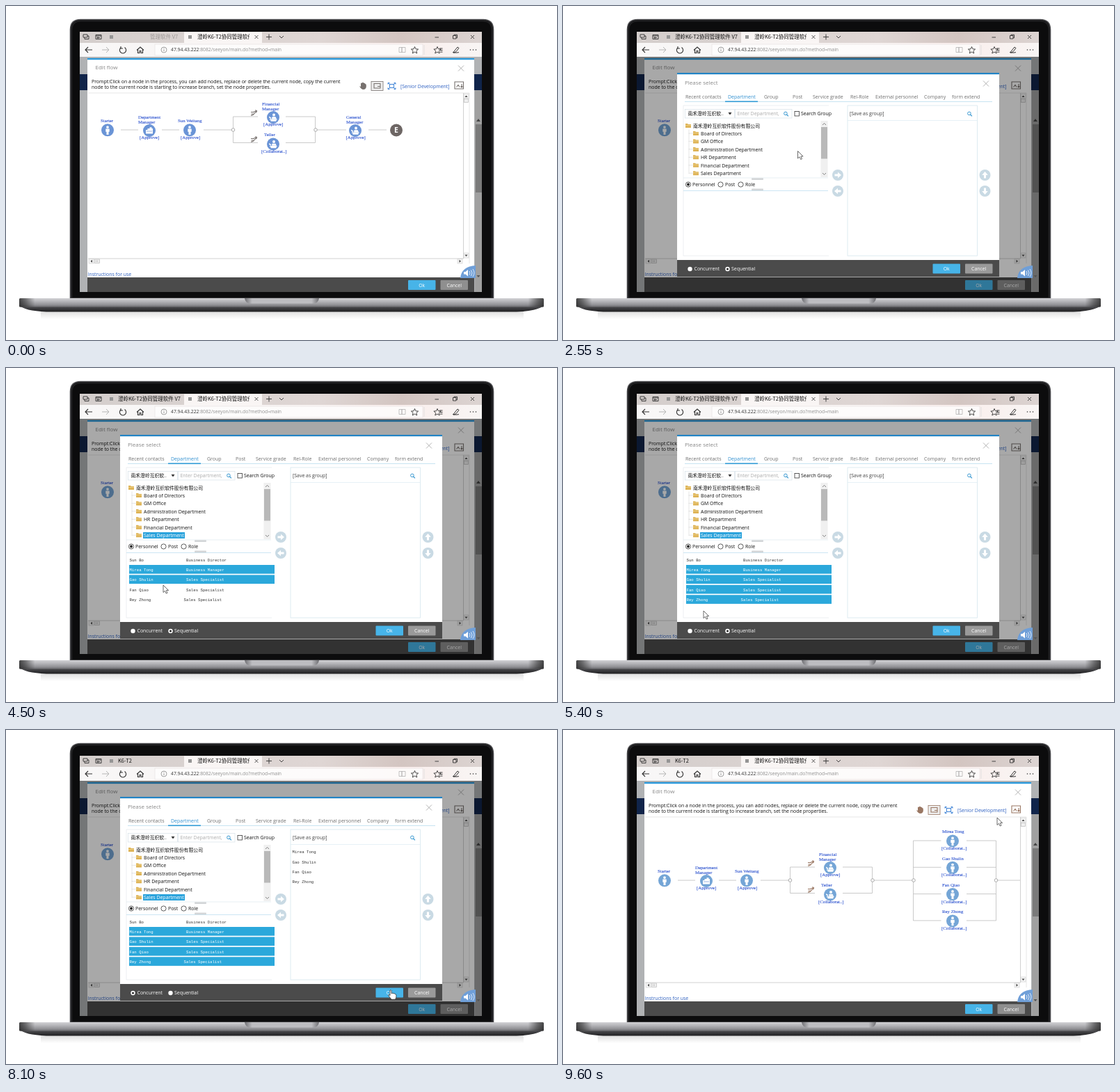
Animation of 792x480 px, one loop 9750 ms. Source, as an HTML page:

```html
<!DOCTYPE html>
<html lang="en">
<head>
<meta charset="utf-8">
<title>Edit flow</title>
<style>
html, body { margin: 0; width: 100%; height: 100%; overflow: hidden; background: #fff; }
svg { display: block; width: 792px; height: 480px; }
text { font: 6.95px "Open Sans", "Noto Sans CJK SC", sans-serif; fill: #111; white-space: pre; }
.title { font-size: 8px; fill: #888; }
.tab { font-size: 7px; fill: #6f6f6f; }
.on { fill: #2f8fd0; }
.url { font-size: 6.8px; fill: #8f8f8f; }
.cjk { font: 7.5px "Noto Sans CJK SC", "Noto Sans CJK", sans-serif; }
.org { font-size: 6.86px; }
.mono { font: 5.7px "Liberation Mono", monospace; fill: #333; }
.node { font: 6.8px "Liberation Serif", serif; fill: #2f55cf; stroke: #2f55cf; stroke-width: .12; }
.link { fill: #2c5fc0; }
.white { fill: #fff; }
.hint { fill: #aaa; }
.mid { text-anchor: middle; }
.ball { fill: var(--ball); }
</style>
</head>
<body>
<script>
const LOOP = 9750, STEP = 150;
const people = [
  ["Sun Bo", "Business Director", 259],
  ["Mirea Tong", "Business Manager", 259],
  ["Gao Shulin", "Sales Specialist", 259],
  ["Fan Qiao", "Sales Specialist", 259],
  ["Rey Zhong", "Sales Specialist", 255.5]
];

const text = (x, y, s, cls = "", more = "") => `<text x="${x}" y="${y}" class="${cls}" ${more}>${s}</text>`;
const rect = (x, y, w, h, fill, more = "") => `<rect x="${x}" y="${y}" width="${w}" height="${h}" fill="${fill}" ${more}/>`;
const disc = (x, y, r, fill, more = "") => `<circle cx="${x}" cy="${y}" r="${r}" fill="${fill}" ${more}/>`;
const line = (d, color = "#bdbdbd", w = .8, more = "") => `<path d="${d}" fill="none" stroke="${color}" stroke-width="${w}" ${more}/>`;
const shape = (d, fill, more = "") => `<path d="${d}" fill="${fill}" ${more}/>`;
const group = (id, body) => `<g id="${id}">${body}</g>`;
const cross = (x, y, r, color, w) => line(`M${x - r} ${y - r}l${2 * r} ${2 * r}m0 ${-2 * r}l${-2 * r} ${2 * r}`, color, w);
const button = (x, y, w, fill, label) => rect(x, y, w, 14, fill, 'rx="1"') + text(x + w / 2, y + 9.8, label, "white mid");
const lens = (x, y) => disc(x - .6, y - .6, 2.3, "none", 'stroke="#3c9ad2"') + line(`M${x + 1} ${y + 1}l2.4 2.4`, "#3c9ad2", 1.3);

function laptop() {
  return rect(50, 438, 694, 12, "url(#shade)")
    + shape("M92.5 420V34Q92.5 19.5 107 19.5H686Q700.5 19.5 700.5 34V420Z", "#0c0c0d", 'stroke="#4c4c4f" stroke-width="1.6"')
    + line("M94.5 419V35Q94.5 21.5 108 21.5H685Q698.5 21.5 698.5 35V419", "#232325", 1.5)
    + shape("M19 430H773Q766 438 734 439.5H58Q26 438 19 430Z", "url(#under)")
    + rect(19, 420, 754, 12.5, "url(#base)", 'rx="1.5"')
    + rect(19, 420, 754, 12.5, "url(#ends)", 'rx="1.5"')
    + shape("M343 420H450Q449 427.5 441 427.5H352Q344 427.5 343 420Z", "url(#notch)");
}

function browser() {
  const ink = "#333";
  const star = (x, y) => line(`M${x} ${y - 5}l1.5 3.3 3.6 .3-2.7 2.4 .8 3.5-3.2-1.9-3.2 1.9 .8-3.5-2.7-2.4 3.6-.3z`, ink, .9);
  return rect(106, 37, 578, 16, "url(#bar)")
    + rect(256, 37.5, 112, 16, "#f9f5f4")
    + line("M111 41h6v4h-6zM113 45v2.5h6v-4.5h-2M129 41.5h8v6h-8zM129 43h8M135 45.5h-4m1.5-1.5l-1.5 1.5 1.5 1.5", ink, .9)
    + rect(149, 42, 5, 5, "#959595") + rect(262, 42, 5, 5, "#959595")
    + text(161, 47.2, "澄岭K6-T2协同管理软件 V7", "cjk", 'id="tabFull"')
    + text(207, 47.2, "管理软件 V7", "cjk", 'id="tabPart" fill-opacity=".3"')
    + text(161, 47.2, "K6-T2", "cjk", 'id="tabShort"')
    + `<g clip-path="url(#tabClip)">${text(275, 47.2, "澄岭K6-T2协同管理软件", "cjk")}</g>`
    + cross(360, 44.5, 2.5, ink, .8)
    + line("M374 44.5h8m-4-4v8M393 43l3 3 3-3M616.5 45h5.5M642.5 42.5h4.5v4.5h-4.5zM644 42.5v-1.2h4.5v4.5h-1.3", ink, .9)
    + cross(670.5, 44.5, 2.5, ink, .9)
    + rect(106, 53, 578, 20, "url(#nav)")
    + rect(214, 55, 385, 16, "#fff", 'fill-opacity=".7" stroke="#e3dedd" stroke-width=".6"')
    + line("M124 63h-10m4-4l-4 4 4 4", ink, 1.1) + line("M138 63h10m-4-4l4 4-4 4", "#b5b5b5", 1)
    + line("M165.5 59.5a4.6 4.6 0 1 0 5 0M165 58v3h3M188 63.5l5-4.5 5 4.5M189.5 62.5v5h2.5v-3h2v3h2.5v-5", ink, 1.1)
    + disc(227, 63, 4, "none", 'stroke="#888" stroke-width=".8"') + line("M227 62.5v2.5M227 60.5v1", "#888", .9)
    + `<text x="237" y="64.8" class="url"><tspan fill="#333">47.94.43.222</tspan>:8082/seeyon/main.do?method=main</text>`
    + line("M565 59.5h4v7h-4zM569 59.5h5v7h-5z", "#aaa", .7)
    + star(587.5, 63.5) + line("M601 56v14", "#ddd") + star(620, 63.5)
    + line("M623 61h4.5M624 63.5h3.5M624 66h3.5M642 67q2-1 3-3l4-5 2 1.5-4 5q-2 1.5-4 1.5h6q1-1 2 0", ink, 1)
    + disc(667.5, 63, .8, ink) + disc(671.5, 63, .8, ink) + disc(675.5, 63, .8, ink);
}

const person = `<circle cy="-4.2" r="1.9"/><path d="M-2.7-1.7h5.4v4.2h-1.2v4.3h-3v-4.3h-1.2z"/>`;
const clerk = `<circle cx="1" cy="-3.6" r="2"/><path d="M-1.5-.8h5l1.5 3h-7zM-5.5-1.5l3 2.5-1 1.2-2.5-2zM-5 2.6h10.5v1.2h-1v2h-8v-2h-1.5z"/>`;
const desk = `<path d="M-5-1h2.5v-2h3v-1.8h3v1.8h1.5v2v5.5h-10z"/><path d="M-4 1h8" stroke="#6a94d6" stroke-width=".7"/>`;
const icon = (x, y, art) => disc(x, y, 9, "none", 'class="ball"') + `<g transform="translate(${x} ${y})" fill="#fff">${art}</g>`;
const joint = (x, y) => disc(x, y, 2.3, "#fff", 'stroke="#999" stroke-width=".8"');
const fork = y => `<g transform="translate(356 ${y})">${line("M-4 3q3 .5 4.5-2t4-2.5M-4-1.5h4q1.5-1.5 4-1.5M2.5-4.5l2 1.5-2 1.5M-3.5 1h3", "currentColor", 1.2)}</g>`;

// Left part of the chart, its axis at height y
function chart(y) {
  const a = y - 19, b = y + 18.5;
  return line(`M165 ${y}h25M224 ${y}h25M284 ${y}h42M362 ${a}H326.5V${b}H362M402 ${a}H444.5V${b}H402`)
    + joint(326.5, y) + joint(445, y)
    + icon(146, y + .3, person) + icon(206, y + 1, desk) + icon(264, y + .3, person)
    + icon(384, y - 18, clerk) + icon(384, y + 20.5, clerk) + fork(y - 24) + fork(y + 14)
    + text(136, y - 10.8, "Starter", "node")
    + text(190, y - 15.8, "Department", "node") + text(190, y - 9, "Manager", "node") + text(192, y + 13, "[Approve]", "node")
    + text(247, y - 10.8, "Sun Weitang", "node") + text(251, y + 13, "[Approve]", "node")
    + text(368, y - 35, "Financial", "node") + text(368, y - 28, "Manager", "node") + text(370, y - 6, "[Approve]", "node")
    + text(371, y + 8.5, "Teller", "node") + text(367, y + 32.5, "[Collaborat..]", "node");
}

function flowBefore() {
  return line("M447 178h42M521 178h26") + chart(178)
    + icon(502, 179, clerk) + text(489, 162.2, "General", "node") + text(489, 169, "Manager", "node") + text(488.5, 191, "[Approve]", "node")
    + disc(561, 178.5, 9, "#6d6664") + text(561, 182.3, "E", "white mid", 'style="font-size:10.5px;font-weight:700"');
}

function flowAfter() {
  let s = line("M447 216h57M622 216h35M503.5 159v115M622.5 159v115");
  people.slice(1).forEach(([name], i) => {
    const y = 159 + i * 38.3;
    s += line(`M503.5 ${y}h40M580 ${y}h42.5`) + icon(560, y + .5, person)
      + text(545, y - 10.8, name, "node") + text(544, y + 13, "[Collaborat..]", "node");
  });
  return s + joint(504, 216) + joint(622.5, 216) + chart(216);
}

function editor() {
  const tri = d => shape(d, "#444");
  return rect(106, 73, 578, 338, "#b0b2b4")
    + rect(106, 98, 578, 23, "#10244a")
    + rect(674, 121, 10, 290, "#a0a0a0") + rect(675, 170, 9, 98, "#7a7a7a") + tri("M676 166l3-4 3 4z")
    + rect(117, 75, 556, 336, "#fff") + rect(117, 75, 556, 2.2, "#2698dc")
    + text(128.5, 91, "Edit flow", "title") + cross(654, 89.5, 4, "#aaa", .9)
    + text(123, 111.3, "Prompt:Click on a node in the process, you can add nodes, replace or delete the current node, copy the current")
    + text(123, 119, "node to the current node is starting to increase branch, set the node properties.")
    + group("tools",
      shape("M508 115l2 1v-5q1-1 1.5 0l.5-1q1-.6 1.5 .3 1.2-.4 1.5 .6 1.3 0 1.5 1.2 1.3 0 1.3 1.5v3q-1 3.5-4 3.5-3.5 0-5.8-5.1z", "currentColor")
      + rect(525, 108.5, 17, 13, "#eee", 'stroke="currentColor" stroke-width=".8"') + line("M529 111.5h9v6.5h-9zM534 115.5h4", "currentColor", 1.1)
      + line("M645 109h12.5v10h-12.5zM647.5 116.5l2.5-3 2 3M655 112v5m-1.5-1.5l1.5 1.5 1.5-1.5", "currentColor", 1.1))
    + rect(551.5, 112.5, 6, 5, "none", 'stroke="#3d82d6"')
    + line("M549 110.5l2.5 2m6 0l2.5-2m0 9l-2.5-2m-6 0l-2.5 2M549 112.5v-2h2.5M560 112.5v-2h-2.5M549 117.5v2h2.5M560 117.5v2h-2.5", "#3d82d6", 1)
    + text(567, 117.5, "[Senior Development]", "link")
    + line("M118 125H666V370", "#ddd", .7) + line("M657.5 125V363H118", "#c6c6c6", .8)
    + rect(658, 126, 7, 7, "#f4f4f4", 'stroke="#ccc" stroke-width=".6"') + tri("M659.5 131l2-2.5 2 2.5z")
    + rect(658.5, 133.5, 6, 5, "#f0f0f0", 'stroke="#bbb" stroke-width=".7"')
    + rect(658, 355, 7, 7, "#f4f4f4", 'stroke="#ccc" stroke-width=".6"') + tri("M659.5 357.5l2 2.5 2-2.5z")
    + rect(119, 363.5, 7, 6.5, "#f4f4f4", 'stroke="#ccc" stroke-width=".6"') + tri("M124 364.7l-2.5 2 2.5 2z")
    + rect(127, 364, 7.5, 5.5, "#f0f0f0", 'stroke="#bbb" stroke-width=".7"')
    + line("M129.5 365.5v2.5M131.5 365.5v2.5", "#aaa", .6)
    + rect(649, 363.5, 7, 6.5, "#f4f4f4", 'stroke="#ccc" stroke-width=".6"') + tri("M651.5 364.7l2.5 2-2.5 2z")
    + group("before", flowBefore()) + group("after", flowAfter())
    + text(117.5, 387.8, "Instructions for use", "link")
    + rect(117, 390, 556, 21, "#4b4b4b")
    + button(578, 394, 39.5, "#47b4e8", "Ok") + button(624.5, 394, 39.5, "#8f8f8f", "Cancel");
}

const speaker = shape("M653 391Q655 374 675 373V391Z", "#6f9fd8")
  + shape("M658 382h2.5l3.5-3v9.5l-3.5-3h-2.5z", "#fff")
  + line("M666 381q2 2.7 0 5.5M668.5 379.5q3 4.2 0 8.5M671 378q4 5.5 0 11", "#fff", .8)
  + shape("M676.5 387l2.5 3 2.5-3z", "#555");

function picker() {
  const tabs = { "Recent contacts": 176, Department: 237, Group: 289, Post: 330, "Service grade": 359, "Rel-Role": 413, "External personnel": 449, Company: 519, "form extend": 559 };
  const folder = (x, y) => shape(`M${x} ${y - 5.5}h3l1 1h4v5h-8z`, "#deb457") + line(`M${x} ${y - 3}h8`, "#efd592", .8);
  const round = (x, y, turn, id = "") => `<g transform="translate(${x} ${y}) rotate(${turn})">${disc(0, 0, 8, "#c9dae4", id && `id="${id}"`)}${shape("M-4.5-1.5h4.5v-2.8l5 4.3-5 4.3v-2.8h-4.5z", "#fff")}</g>`;
  const radio = (x, on) => disc(x, 256.5, 3.6, "#fff", 'stroke="#333" stroke-width=".8"') + (on ? disc(x, 256.5, 1.9, "#222") : "");
  const grip = y => rect(271, y, 17, 2.6, "#d3d6d8", 'rx="1"');

  let s = rect(164, 96, 463, 293, "#fff") + rect(164, 96, 463, 2.2, "#2183c4")
    + text(175, 113, "Please select", "title") + cross(608, 111.5, 4, "#aaa", .9);
  for (const name in tabs) s += text(tabs[name], 132.7, name, name == "Department" ? "tab on" : "tab");
  s += line("M175 137.5H617", "#b9dcee", .8) + rect(233, 136.5, 47, 1.6, "#2f9ad6")
    + line("M173 143V359H382M173 143H382", "#e4e9ec", .7)
    + rect(175.5, 148.5, 71, 12.5, "#fff", 'stroke="#d8e2e8" stroke-width=".7"')
    + text(179.5, 157, "南禾澄岭互织软..", "cjk", 'style="font-size:6.8px"') + shape("M237.5 153l2.5 3.5 2.5-3.5z", "#333")
    + rect(247.5, 148.5, 81.5, 12.5, "#fff", 'stroke="#d8e2e8" stroke-width=".7"')
    + text(250.5, 157, "Enter Department,", "hint") + lens(320.5, 155)
    + rect(333, 151.5, 6.5, 6.5, "#fff", 'stroke="#333" stroke-width=".8"') + text(342, 157.2, "Search Group");

  s += line("M181 178V240.5", "#aaa", .6, 'stroke-dasharray="1 1"') + folder(176, 174.5)
    + text(187, 175.2, "南禾澄岭互织软件股份有限公司", "cjk org") + rect(197, 236, 60, 9, "#dedede", 'id="pick"');
  ["Board of Directors", "GM Office", "Administration Department", "HR Department", "Financial Department", "Sales Department"].forEach((name, i) => {
    const y = 186 + i * 11.45;
    s += line(`M181 ${y - 3}h5`, "#aaa", .6, 'stroke-dasharray="1 1"') + folder(187, y - .5)
      + text(198, y, name, "", i == 5 ? 'id="pickName"' : "");
  });
  s += rect(370.5, 165, 10, 81, "#f0f0f0") + rect(371, 174, 9, 45.5, "#b9b9b9")
    + line("M373 171l2.5-2.5 2.5 2.5M373 240l2.5 2.5 2.5-2.5", "#777", .9)
    + line("M173 247H381", "#dde8ee", .7) + grip(247.3)
    + radio(180, true) + text(186, 258.7, "Personnel") + radio(226.5) + text(233, 258.7, "Post") + radio(255.5) + text(262, 258.7, "Role")
    + line("M173 265.5H381", "#bfe0f0", .8) + grip(262.6);
  people.forEach(([name, role, x], i) => {
    const y = 277.6 + i * 14.4;
    s += rect(177, y - 9, 209, 12.7, "#2ba8db", `id="row${i}"`)
      + `<g id="who${i}">${text(177.5, y, name, "mono")}${text(x, y, role, "mono")}</g>`;
  });
  s += rect(409, 143, 186.5, 216, "#fff", 'stroke="#cfe3ec" stroke-width=".7"') + line("M409 164.5H595.5", "#dcebf2", .7)
    + text(412, 157.2, "[Save as group]", "", 'fill-opacity=".8"') + lens(584.5, 155)
    + group("chosen", people.slice(1).map(([name], i) => text(411.5, 177.2 + i * 14.4, name, "mono")).join(""))
    + round(395, 243, 0, "add") + round(395, 266, 180) + round(606.5, 243, -90) + round(606.5, 266, 90)
    + rect(164, 365, 463, 24, "#4b4b4b")
    + disc(182.5, 378, 3.2, "#fff") + disc(182.5, 378, 1.5, "#222", 'id="conc"') + text(188.5, 380, "Concurrent", "white")
    + disc(236.5, 378, 3.2, "#fff") + disc(236.5, 378, 1.5, "#222", 'id="seq"') + text(242, 380, "Sequential", "white")
    + button(531.5, 370.5, 39.5, "#47b4e8", "Ok") + button(578, 370.5, 39.5, "#9a9a9a", "Cancel");
  return s;
}

const fade = (id, down, ...stops) => `<linearGradient id="${id}" ${down ? 'x2="0" y2="1"' : ""}>${stops.map(([at, color]) => `<stop offset="${at}" stop-color="${color}"/>`).join("")}</linearGradient>`;
document.body.innerHTML = `<svg viewBox="0 0 792 480" xmlns="http://www.w3.org/2000/svg"><defs>
${fade("bar", false, [0, "#d4cecc"], [.6, "#dfd6d4"], [.8, "#d3c5c1"], [1, "#dcd4d2"])}
${fade("nav", false, [0, "#f8f7f7"], [.6, "#f9f4f3"], [.8, "#faeeec"], [1, "#f8f5f4"])}
${fade("base", true, [0, "#d2d2d5"], [.35, "#b6b6ba"], [.75, "#929296"], [1, "#6a6a6e"])}
${fade("ends", false, [0, "#222c"], [.012, "#2228"], [.03, "#2220"], [.97, "#2220"], [.988, "#2228"], [1, "#222c"])}
${fade("under", true, [0, "#6a6a6e"], [.35, "#454548"], [1, "#1f1f21"])}
${fade("notch", false, [0, "#6e6e72"], [.1, "#bdbdc1"], [.9, "#bdbdc1"], [1, "#6e6e72"])}
${fade("shade", true, [0, "#dcdcdc"], [1, "#fff"])}
<clipPath id="tabClip"><rect x="270" y="37" width="80" height="16"/></clipPath>
<clipPath id="screen"><rect x="106" y="37" width="578" height="374"/></clipPath></defs>
${laptop()}<g clip-path="url(#screen)">${browser()}${editor()}
${group("dialog", rect(106, 73, 578, 338, "#000", 'fill-opacity=".34"') + picker())}${speaker}
${group("cursor",
  group("arrow", shape("M0 0V10.5L2.5 8.3 4.2 12 6 11.2 4.4 7.6H7.6Z", "#fff", 'stroke="#444" stroke-width=".8"'))
  + group("hand", shape("M0 0q1.5-1 2 .5v4l1.5-.3q1-.2 1.5 .6l1.3-.1q1 .2 1.2 1 1.4 .1 1.4 1.5v2q0 2-1.5 4H2L-2 8q-.8-1.6 .6-1.6L0 7.5Z", "#fff", 'stroke="#333" stroke-width=".8"')))}
</g></svg>`;

// time, x, y of the pointer
const path = [
  [600, 620, 330], [1350, 447, 177], [2250, 447, 177], [2850, 228, 240], [3150, 228, 240], [3600, 344, 210],
  [4050, 230, 290], [4950, 222, 334], [5400, 202, 349], [5850, 182, 376], [6150, 182, 376], [6750, 397, 243],
  [7200, 397, 243], [7950, 552, 374], [8550, 552, 374], [9300, 624, 126], [9750, 624, 126]
];
const el = id => document.getElementById(id);
const show = (id, on) => { el(id).style.display = on ? "" : "none"; };
const within = (t, a, b) => t >= a && t < b;

function pointer(t) {
  const i = Math.max(1, path.findIndex(p => p[0] > t));
  const [t0, x0, y0] = path[i - 1], [t1, x1, y1] = path[i];
  const k = Math.min(1, Math.max(0, (t - t0) / (t1 - t0))), e = k * k * (3 - 2 * k);
  return [x0 + (x1 - x0) * e, y0 + (y1 - y0) * e];
}

function draw(t) {
  const open = t >= 2250, done = t >= 8550, blue = t >= 4050, conc = t >= 6000;
  show("tabPart", t < 300);
  show("tabFull", within(t, 300, 7500));
  show("tabShort", t >= 7500);
  show("before", !done);
  show("after", done);
  show("dialog", open && !done);
  document.body.style.setProperty("--ball", open ? "#74a5d6" : "#6a94d6");
  el("tools").style.color = el("before").style.color = el("after").style.color = done ? "#9a7763" : "#77716e";
  show("pick", t >= 3000);
  el("pick").style.fill = blue ? "#2ba3dc" : "#dedede";
  el("pickName").style.fill = blue ? "#fff" : "";
  people.forEach((p, i) => {
    const on = i > 0 && t >= 3750 + i * 300;
    show("row" + i, on);
    show("who" + i, t >= 3000);
    for (const n of el("who" + i).children) n.style.fill = on ? "#fff" : "";
  });
  show("chosen", t >= 7050);
  show("conc", conc);
  show("seq", !conc);
  const overAdd = within(t, 6600, 7350);
  el("add").style.fill = overAdd ? "#3f9fd6" : "";
  const hand = overAdd || within(t, 7950, 8550);
  show("hand", hand);
  show("arrow", !hand);
  show("cursor", t >= 600);
  el("cursor").setAttribute("transform", `translate(${pointer(t)})`);
}

const start = performance.now();
function tick() {
  const t = (performance.now() - start) % LOOP;
  draw(Math.floor(t / STEP) * STEP);
  requestAnimationFrame(tick);
}
tick();
</script>
</body>
</html>
```
